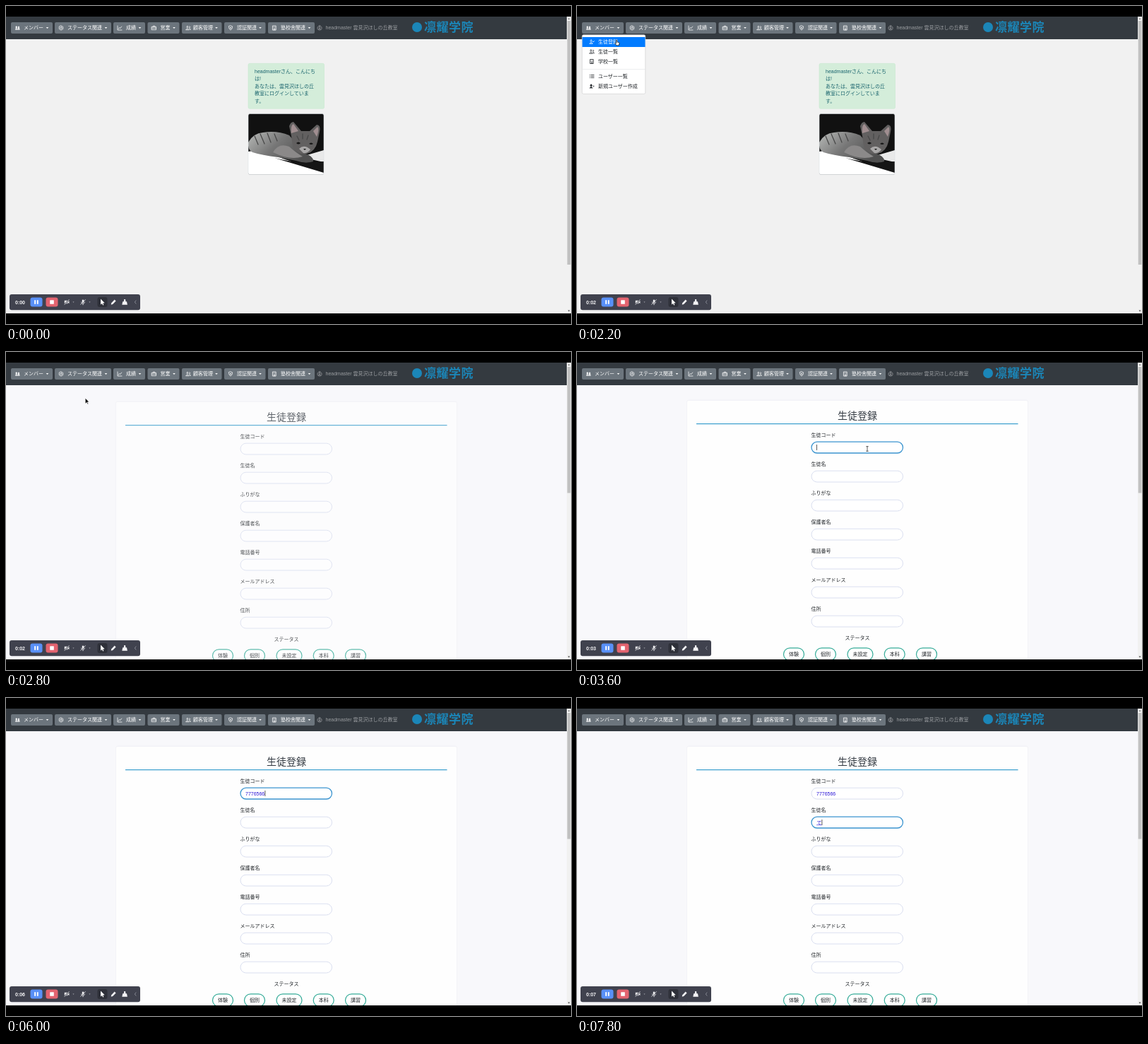
Animation of 800 by 450 pixels, one loop 8000 ms. Source, as an HTML page:

```html
<!DOCTYPE html>
<html lang="ja">
<head>
<meta charset="utf-8">
<title>生徒登録</title>
<style>
  html, body { margin: 0; width: 100%; height: 100%; overflow: hidden; background: #000; }
  svg { display: block; width: 100%; height: 100%; }
  text { font: 7px "Liberation Sans", "Noto Sans CJK JP", "Noto Sans CJK", sans-serif; white-space: pre; }
</style>
</head>
<body>
<svg id="stage" viewBox="0 0 800 450"></svg>
<script>
const rect = (x, y, w, h, fill, r = 0, extra = "") =>
  `<rect x="${x}" y="${y}" width="${w}" height="${h}" rx="${r}" fill="${fill}" ${extra}/>`;
const path = (d, fill, stroke = "none", width = 1) =>
  `<path d="${d}" fill="${fill}" stroke="${stroke}" stroke-width="${width}" stroke-linecap="round" stroke-linejoin="round"/>`;
// Text is placed by its left edge (or middle) and its vertical centre.
const text = (x, y, string, fill = "#212529", size = 7, extra = "") =>
  `<text x="${x}" y="${y + size * 0.37}" fill="${fill}" style="font-size:${size}px;${extra}">${string}</text>`;
const centred = (x, y, string, fill, size) => text(x, y, string, fill, size, "text-anchor:middle");
const at = (x, y, content) => `<g transform="translate(${x} ${y})">${content}</g>`;
const group = (id, content) => `<g id="${id}">${content}</g>`;

// Icons are drawn around their own centre; "solid" ones are filled.
const icons = {
  members: ["M-2.6 2.3V1.2Q-1.3-.3 0 1.2V2.3ZM.7 2.3V.9Q2-.4 3.2 1V2.3ZM-1.3-2.2a1.1 1.1 0 1 0 .1 0ZM1.9-1.9a1 1 0 1 0 .1 0Z", true],
  gear: ["M0-3.1L2.7-1.6V1.6L0 3.1L-2.7 1.6V-1.6ZM0-1.2a1.2 1.2 0 1 0 .1 0Z"],
  chart: ["M-3-3V3H3M-1.9 1.4L-.4-.6L.7.6L2.7-2"],
  bag: ["M-3-1.6H3V2.6H-3ZM-1.2-1.6V-2.8H1.2V-1.6M-3 .3H3"],
  people: ["M-3.2 2.4Q-1.2-.8.8 2.4ZM-1.2-2.4a1.1 1.1 0 1 0 .1 0ZM1.6-2.2a1 1 0 1 1 .1 2M1.5.5Q2.8.6 3.3 2.4H2"],
  shield: ["M0-3.1L2.6-2.1Q2.8 1.5 0 3.1Q-2.8 1.5-2.6-2.1ZM0-1V.9M-.7 0H.7"],
  building: ["M-2.2-3H2.2V3H-2.2ZM-.8 3V1.3H.8V3M-1-1.6H-.9M1-1.6H.9M-1 0H-.9M1 0H.9"],
  user: ["M0-3.1a3.1 3.1 0 1 0 .1 0ZM0-1.6a1.1 1.1 0 1 0 .1 0ZM-2 2.1Q0 .2 2 2.1"],
  enroll: ["M-3 2.5Q-1 -.6 1 2.5ZM-1-2.4a1.2 1.2 0 1 0 .1 0ZM1.3-.3L2 .5L3.4-1.1"],
  list: ["M-1.2-2H3M-1.2 0H3M-1.2 2H3M-3-2H-2.8M-3 0H-2.8M-3 2H-2.8"],
  add: ["M-3 2.6Q-1-1.2 1 2.6ZM-1-2.6a1.4 1.4 0 1 0 .1 0ZM1.4 0H3.4M2.4-1V1", true],
};
const icon = (name, x, y, color) => {
  const [d, solid] = icons[name];
  return at(x, y, path(d, solid ? color : "none", color, solid ? 0.4 : 0.75));
};

function navbar() {
  const buttons = [
    [7, 59, "members", "メンバー"], [69, 80, "gear", "ステータス関連"], [152, 45, "chart", "成績"],
    [200.5, 45, "bag", "営業"], [249, 56.5, "people", "顧客管理"], [309, 58.5, "shield", "認証関連"],
    [371, 66, "building", "塾校舎関連"],
  ];
  return rect(0, 15, 794, 32, "#343a40") +
    buttons.map(([x, w, name, label]) => {
      const textX = name === "people" ? x + 16 : x + 18;
      return rect(x, 23, w, 16, "#6c757d", 2) + icon(name, x + 9, 31, "#fff") +
        text(textX, 30.8, label, "#fff") + path(`M${x + w - 9.3} 30h3.6l-1.8 1.9Z`, "#fff");
    }).join("") +
    icon("user", 444, 31, "#9a9da0") +
    text(452.5, 30.8, "headmaster 雲見沢ほしの丘教室", "#9a9da0") +
    `<circle cx="582" cy="30" r="7" fill="#1b86b8"/>` +
    text(592, 29.6, "凛耀学院", "#1b86b8", 17, "font-weight:700;letter-spacing:.5px");
}

function scrollbar(id, thumbHeight) {
  return group(id, rect(794, 15, 6, 420, "#f1f1f1") + rect(794.7, 21, 4.6, thumbHeight, "#c1c1c1") +
    path("M795.5 19l1.5-2l1.5 2Z", "#777") + path("M795.5 430.5l1.5 2l1.5-2Z", "#444"));
}

function kitten() {
  return `<clipPath id="photo"><rect x="343" y="152.5" width="107" height="86" rx="2.5"/></clipPath>
    <linearGradient id="fur" x2="1" y2=".5"><stop stop-color="#b9bbb9"/><stop offset=".5" stop-color="#777"/><stop offset="1" stop-color="#505050"/></linearGradient>
    <g clip-path="url(#photo)">` +
    rect(343, 152, 107, 87, "#111") +
    path("M343 206L362 203L392 216L450 235V239H343Z", "#fff") +
    path("M426 211L450 204V221L432 217Z", "#e9e9e9") +
    path("M343 193Q350 180 364 179Q384 176 401 183L424 209Q436 213 435 220Q425 224 411 219L385 214Q362 211 349 207Q342 203 343 193Z", "url(#fur)") +
    path("M378 207Q386 193 401 199Q411 208 420 213Q402 219 378 207Z", "#8b8989") +
    path("M404 184L401 170Q403 164 407 164L418 177L430 177L440 168Q446 168 444 178L441 192Q438 206 426 209Q413 211 406 199Z", "#626060") +
    path("M404 180Q403 168 407 167L414 177ZM435 177L441 171Q444 174 440 185Z", "#a08e90") +
    path("M415 202Q422 195 431 203Q427 209 421 208Z", "#a9a7a7") +
    path("M411 194q3-3 6 0q-3 3-6 0ZM429 195q3-3 6 0q-3 2-6 0ZM421 202h4l-2 2Z", "#171717") +
    path("M352 184l5 12M360 181l6 14M370 180l5 13M380 181l4 10M412 184l3 6M420 181v7M428 183l-2 6", "none", "#484848", 1.3) +
    path("M380 215Q400 220 424 222L450 220V236Z", "#151515") +
    `</g>` + rect(343, 152.5, 107, 86, "none", 2.5, `stroke="#dee2e6" stroke-width=".6"`);
}

function homePage() {
  const lines = ["headmasterさん、こんにち", "は!", "あなたは、雲見沢ほしの丘", "教室にログインしていま", "す。"];
  return rect(0, 47, 794, 388, "#f1f1f1") +
    rect(343, 81.3, 107.5, 64, "#d4edda", 2, `stroke="#c3e6cb" stroke-width=".5"`) +
    lines.map((line, i) => text(352, 92 + i * 10.5, line, "#17636c")).join("") + kitten();
}

function menu() {
  const items = [[50.5, "enroll", "生徒登録"], [64.5, "people", "生徒一覧"], [78.5, "building", "学校一覧"],
    [99.5, "list", "ユーザー一覧"], [113.5, "add", "新規ユーザー作成"]];
  const draw = ([y, name, label], color) => icon(name, 21, y, color) + text(30, y, label, color);
  return rect(7.2, 40.8, 89.6, 83.6, "#fff", 2, `stroke="#c9cacb" stroke-width=".6"`) +
    path("M8 89.6H96.5", "none", "#e3e6e9", 0.7) +
    items.map(item => draw(item, "#212529")).join("") +
    group("hover", rect(7.5, 44, 89, 14, "#007bff") + draw(items[0], "#fff"));
}

const fieldY = i => 127.2 + i * 41;
function form() {
  const labels = ["生徒コード", "生徒名", "ふりがな", "保護者名", "電話番号", "メールアドレス", "住所"];
  const pills = [[307, 29, "体験"], [352, 29, "個別"], [401, 36, "未設定"], [449.7, 29, "本科"], [495, 29, "講習"]];
  return rect(155, 67.5, 484, 380, "#f3f3f7", 3) + rect(156, 69, 482, 380, "#fefefe", 2) +
    centred(397, 89.5, "生徒登録", "#333a42", 14) +
    path("M169.5 101.7H624", "none", "#3fa0cf", 1.3) +
    labels.map((label, i) => text(331.5, 117.8 + i * 41, label) +
      rect(332, fieldY(i), 129.5, 15.8, "#fff", 7.9, `class="field" stroke="#dadff0" stroke-width="1"`)).join("") +
    centred(397, 404.3, "ステータス", "#212529") +
    pills.map(([x, w, label]) => rect(x - w / 2, 418.8, w, 18, "#fff", 9, `stroke="#35ab98" stroke-width="1.2"`) +
      centred(x, 427.7, label, "#212529")).join("");
}

function toolbar() {
  const white = "#f4f4f6";
  const camera = path("M-3.2-2.3H1.2V2.3H-3.2ZM1.2-.5L3.4-2V2L1.2.5Z", white) + path("M-3 3.4L3.2-3.4", "none", "#40424e", 2) + path("M-3 3.4L3.2-3.4", "none", white, 0.8);
  const mic = path("M-1.2-3.3H1.2V.6H-1.2Z", white) + path("M-2.5 0Q-2 2.2 0 2.2Q2 2.2 2.5 0M0 2.2V3.8M-3.3 3.2L3.3-3.3", "none", white, 0.8);
  return rect(5, 408, 185, 22.3, "#40424e", 3) +
    group("clock", text(13, 419, "", white, 7, "font-weight:700")) +
    rect(34.5, 412.5, 17, 13, "#5990f7", 3) + rect(40.2, 416.2, 1.9, 5.6, "#fff") + rect(43.8, 416.2, 1.9, 5.6, "#fff") +
    rect(56.5, 412.5, 17, 13, "#e36470", 3) + rect(62.2, 416.2, 5.6, 5.6, "#fff", 0.5) +
    at(86, 419, camera) + at(109, 419, mic) +
    [95.5, 118.5].map(x => path(`M${x - 1} 418.6h2l-1 1.2Z`, "#b9bac2")).join("") +
    rect(129.5, 412, 14, 14, "#2e3039", 3) +
    path("M134 414.5L139.7 420.2L137.2 420.5L138.4 423L137.2 423.5L136 421L134 422.6Z", "#fff") +
    path("M148.7 422.7L149.3 420.2L153.7 415.6L155.6 417.5L151.2 422Z", white) +
    path("M167.2 415h1.8l.5 3.2h1.5l.9 4.6h-7.6l.9-4.6h1.5Z", white) +
    path("M184 416.8L182.3 419L184 421.2", "none", "#9698a2", 0.8);
}

const cursors = {
  arrow: path("M0 0L5.4 5.4L3.1 5.6L4.4 8.2L3.2 8.7L2 6.1L0 7.8Z", "#111", "#fff", 0.6),
  hand: path("M-1.6-3.5Q-.8-4.4-.2-3.5V-1L2.2-.5Q3.1-.2 3 .8L2.2 3.8H-1.2L-3.2.8Q-3-.2-1.6.7Z", "#fff", "#222", 0.8),
  beam: path("M-1.3-3.3H1.3M0-3.3V3.3M-1.3 3.3H1.3", "none", "#333", 0.8),
};

const stage = document.getElementById("stage");
stage.innerHTML =
  group("home", homePage()) +
  group("register", rect(0, 47, 794, 388, "#f8f8fb") + group("form", form()) +
    group("code", text(339, 135, "", "#2a16d6")) + group("name", text(339.5, 176, "", "#2a16d6")) +
    group("underline", path("M339.5 179.6h7", "none", "#2a16d6", 0.6)) +
    group("caret", rect(0, -4, 0.8, 8, "#333"))) +
  navbar() + scrollbar("shortBar", 345) + scrollbar("longBar", 178.5) +
  group("menu", menu()) + group("toolbar", toolbar()) +
  Object.entries(cursors).map(([id, shape]) => group(id, shape)).join("") +
  rect(0, 0, 800, 15, "#000") + rect(0, 435, 800, 15, "#000");

const el = id => document.getElementById(id);
const show = (id, visible) => el(id).setAttribute("display", visible ? "inline" : "none");
const move = (id, x, y) => el(id).setAttribute("transform", `translate(${x} ${y})`);
const write = (id, string) => { el(id).firstChild.textContent = string; };
const clamp = v => Math.max(0, Math.min(1, v));
const fields = [...document.querySelectorAll(".field")];

const pointerTrack = [
  [200, 150, 330], [800, 37, 39], [1400, 37, 39], [1800, 57, 52], [2600, 57, 52],
  [3400, 411, 137], [6200, 411, 137], [6600, 415, 177],
];
function pointerAt(t) {
  let [, x, y] = pointerTrack[0];
  for (let i = 1; i < pointerTrack.length; i++) {
    const [t0, x0, y0] = pointerTrack[i - 1], [t1, x1, y1] = pointerTrack[i];
    if (t < t0) break;
    const p = clamp((t - t0) / (t1 - t0)), s = p * p * (3 - 2 * p);
    x = x0 + (x1 - x0) * s;
    y = y0 + (y1 - y0) * s;
  }
  return [x, y];
}

const LOOP = 8000, STEP = 200, CODE = "7776566";

function render(t) {
  const loaded = t >= 2400;
  show("home", !loaded);
  show("shortBar", !loaded);
  show("register", loaded);
  show("longBar", loaded);
  show("toolbar", t < 2400 || t >= 2800);
  write("clock", "0:0" + Math.floor(t / 1000));

  const [x, y] = pointerAt(t);
  show("menu", t >= 1400 && !loaded);
  show("hover", y > 44 && t >= 1400 && !loaded);

  const p = clamp((t - 2400) / 800), eased = 1 - (1 - p) ** 2;
  el("form").setAttribute("opacity", 0.1 + 0.9 * eased);
  move("form", 0, 8 * (1 - eased));

  const focus = t < 3400 ? -1 : t < 6800 ? 0 : 1;
  fields.forEach((field, i) => {
    field.setAttribute("stroke", i === focus ? "#3b94cf" : "#dadff0");
    field.setAttribute("stroke-width", i === focus ? 1.3 : 1);
  });

  const typed = CODE.slice(0, Math.max(0, (t - 4600) / STEP));
  const name = t >= 7800 ? "て" : t >= 7600 ? "ｔ" : "";
  write("code", typed);
  write("name", name);
  show("underline", name);
  show("caret", focus >= 0 && !(t >= 4400 && t < 4800));
  if (focus === 0) move("caret", 339.2 + typed.length * 3.9, 135);
  else move("caret", 339.5 + name.length * 7, 176);

  const visible = (t >= 200 && t < 4800) || (t >= 6200 && t < 7600);
  const shape = t >= 3400 ? "beam" : t >= 800 && t < 2600 ? "hand" : "arrow";
  for (const id in cursors) {
    show(id, visible && id === shape);
    move(id, x, y);
  }
}

function tick() {
  render(Math.floor(performance.now() % LOOP / STEP) * STEP);
  requestAnimationFrame(tick);
}
tick();
</script>
</body>
</html>
```
